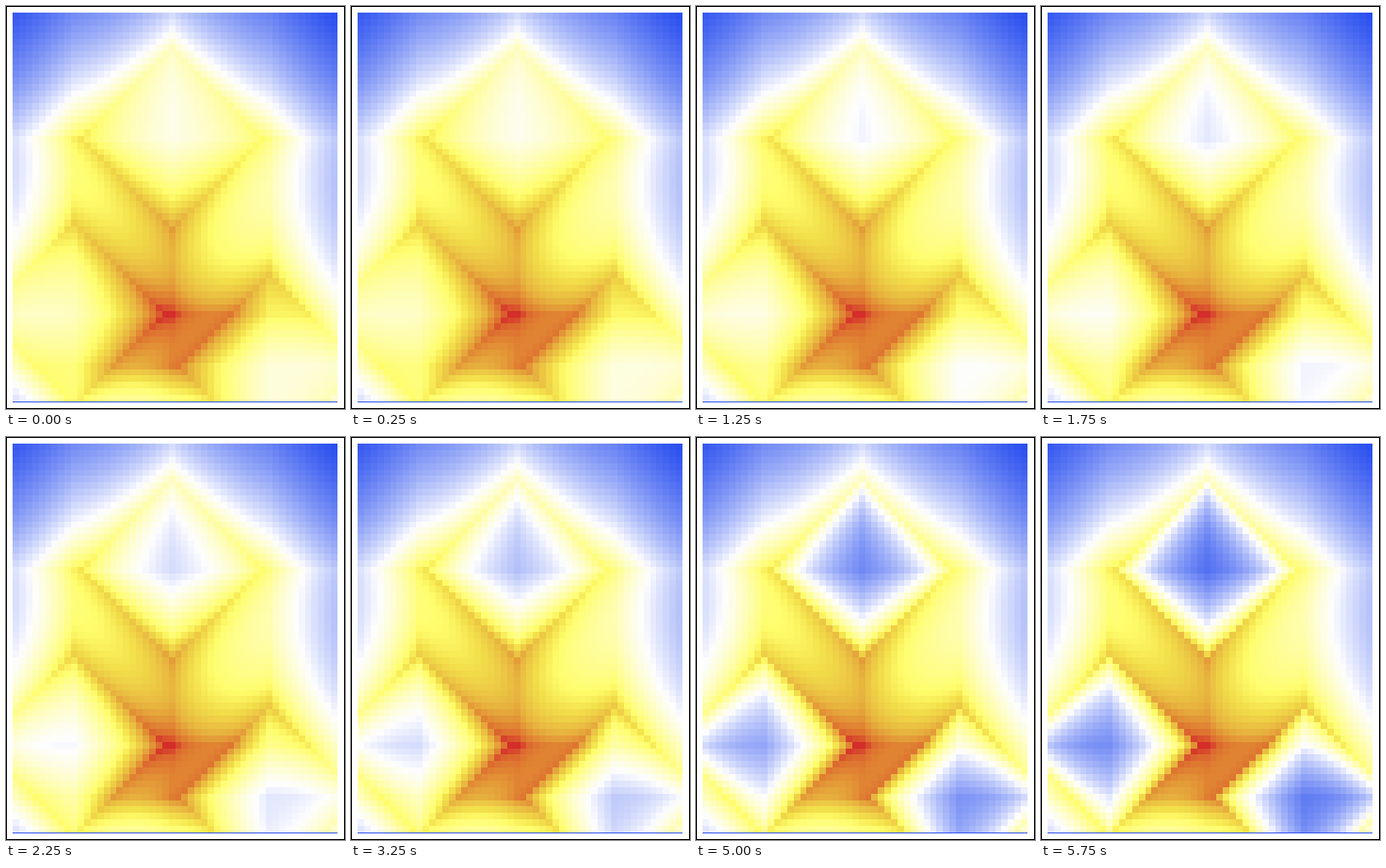
Animation, 360 px wide and 428 px high, one loop 6000 ms. Source, as an HTML page with a canvas:

```html
<!DOCTYPE html>
<html lang="en">
<head>
<meta charset="utf-8">
<title>Heat map</title>
<style>
  html, body { margin: 0; width: 100%; height: 100%; overflow: hidden; background: #fff; }
  canvas { display: block; }
</style>
</head>
<body>
<canvas id="stage" width="360" height="428"></canvas>
<script>
const ctx = document.getElementById('stage').getContext('2d');

const COLS = 50, ROWS = 60;
const PLOT = { x: 7, y: 7, w: 345, h: 413 };
const SITES = [[24, 19], [9, 46], [39, 54]];
const BUFFER = 14;      // Manhattan radius of the zone around each site
const DECAY = 0.7;      // fall-off exponent outside the zone
const STEP = 250, STEPS = 24;

// Colour scale: [position, red, green, blue]
const SCALE = [
  [0, 43, 80, 239],
  [0.42, 253, 253, 255],
  [0.67, 255, 253, 108],
  [0.73, 243, 225, 75],
  [0.83, 231, 178, 62],
  [0.9, 224, 130, 50],
  [0.94, 220, 105, 47],
  [0.985, 212, 45, 42]
];

function colour(u) {
  const last = SCALE[SCALE.length - 1];
  u = Math.min(Math.max(u, 0), last[0]);
  const i = Math.max(1, SCALE.findIndex(stop => u <= stop[0]));
  const a = SCALE[i - 1], b = SCALE[i];
  const k = (u - a[0]) / (b[0] - a[0]);
  const [r, g, bl] = [1, 2, 3].map(c => Math.round(a[c] + (b[c] - a[c]) * k));
  return `rgb(${r},${g},${bl})`;
}

// Distance decay with a buffer zone, summed over all sites
function score(col, row, g) {
  return SITES.reduce((sum, [x, y]) => {
    const d = Math.abs(col - x) + Math.abs(row - y);
    return sum + (d >= BUFFER
      ? d ** -DECAY
      : BUFFER ** (g - DECAY) / (2 * BUFFER - d) ** g);
  }, 0);
}

const LOW = score(COLS - 1, 0, 1);
const HIGH = score(23, 46, 1);
const edgeX = col => PLOT.x + Math.round(col * PLOT.w / COLS);
const edgeY = row => PLOT.y + Math.round(row * PLOT.h / ROWS);

function draw(step) {
  const g = 0.385 * 1.068 ** step;
  ctx.fillStyle = '#000';
  ctx.fillRect(0, 0, 360, 428);
  ctx.fillStyle = '#fff';
  ctx.fillRect(1, 1, 358, 426);
  for (let row = 0; row < ROWS; row++) {
    for (let col = 0; col < COLS; col++) {
      const x = edgeX(col), y = edgeY(row);
      ctx.fillStyle = colour((score(col, row, g) - LOW) / (HIGH - LOW));
      ctx.fillRect(x, y, edgeX(col + 1) - x, edgeY(row + 1) - y);
    }
  }
  ctx.fillStyle = colour(0.03);
  ctx.fillRect(PLOT.x, PLOT.y + PLOT.h, PLOT.w, 1);
}

let shown = -1;
function tick() {
  const step = Math.floor(performance.now() / STEP) % STEPS;
  if (step !== shown) draw(shown = step);
  requestAnimationFrame(tick);
}
tick();
</script>
</body>
</html>
```
